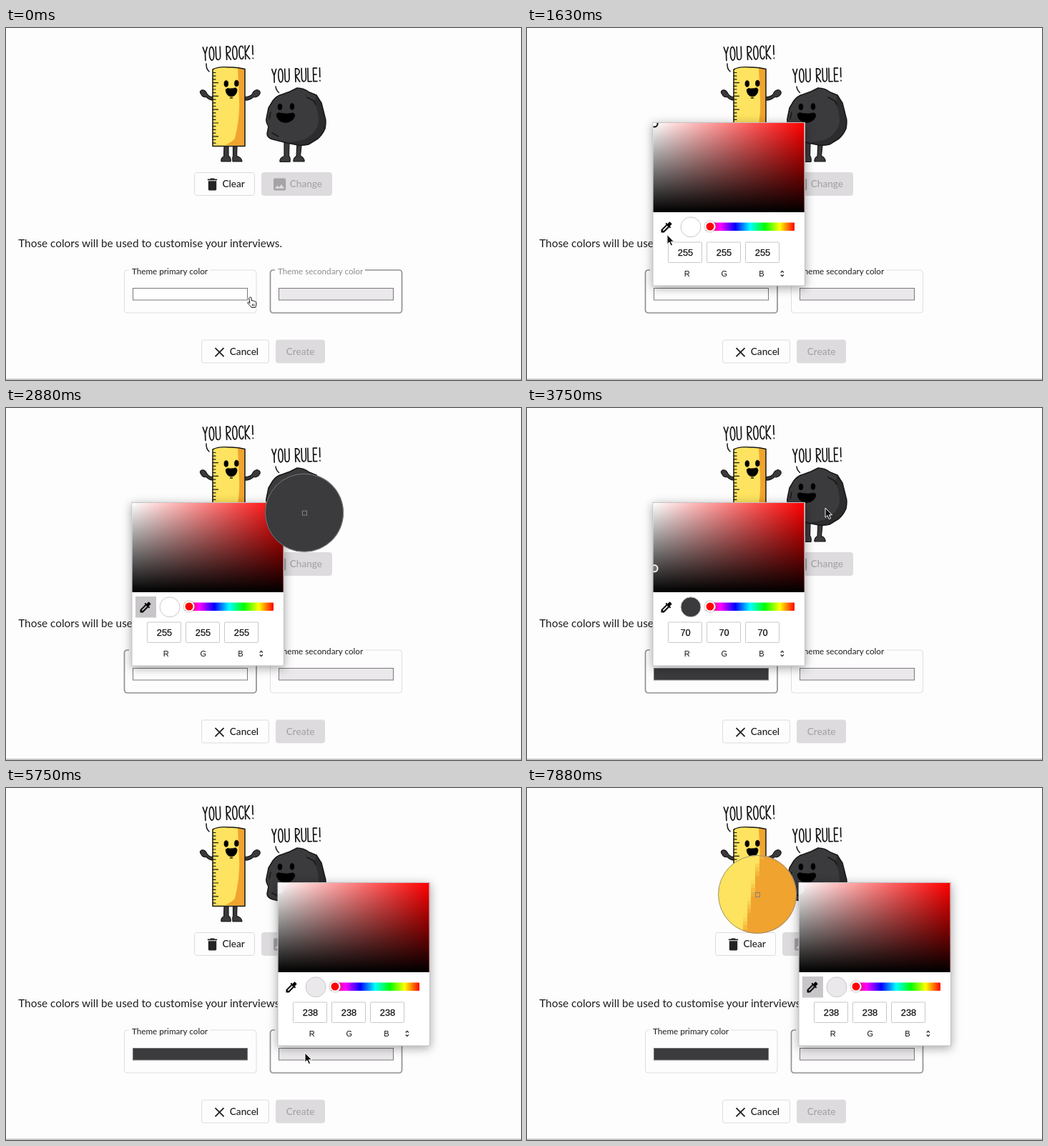
An HTML page with a canvas that plays this animation: 720 px wide and 493 px high, repeating every 8 s.

```html
<!DOCTYPE html>
<html lang="en">
<head>
<meta charset="utf-8">
<title>Theme colors</title>
<style>
  html, body { margin: 0; width: 100%; height: 100%; overflow: hidden; background: #fefdfe; }
  #stage { position: relative; width: 720px; height: 493px; overflow: hidden; }
  #stage > svg { position: absolute; inset: 0; }
  text { font-family: Lato, sans-serif; fill: #1e1d1f; }
  .body { font-size: 15.35px; }
  .btn text { font-size: 13.6px; font-weight: 500; }
  .btn path { fill: #232224; }
  .btn rect { fill: #fefdfe; stroke: #dcdadd; }
  .btn.off rect { fill: #dddbdd; stroke: #dddbdd; }
  .btn.off text, .btn.off path { fill: #a5a3a5; }

  .field path { fill: none; stroke: #dedcdf; }
  .field text { font-size: 11.7px; }
  .field rect { stroke: #79777a; }
  .field.focus path { stroke: #929093; stroke-width: 1.7; }
  .field.focus text { fill: #8f8d90; }

  .letters path { fill: none; stroke: #171717; stroke-width: 1.7; stroke-linecap: round; stroke-linejoin: round; }
  .line { fill: none; stroke: #171717; stroke-width: 1.5; stroke-linecap: round; stroke-linejoin: round; }
  .limb { fill: #3b3a3c; stroke: #171717; stroke-width: 1.2; stroke-linejoin: round; }
  .ink { fill: #000; stroke: #000; stroke-width: .8; stroke-linejoin: round; }

  .panel { fill: #fff; stroke: #c4c2c4; filter: drop-shadow(0 3px 7px rgba(0, 0, 0, .35)); }
  .num rect { fill: #fff; stroke: #cac8ca; }
  .num text { font: 12.8px "Liberation Sans", Arial, sans-serif; text-anchor: middle; fill: #111; stroke: #111; stroke-width: .25; }
  .num .cap { font-size: 11px; stroke: none; }

  #loupe { position: absolute; left: -55px; top: -55px; width: 110px; height: 110px; }
  #loupe canvas { width: 110px; height: 110px; border-radius: 50%; image-rendering: pixelated; }
  #loupe::before { content: ""; position: absolute; inset: 0; border: 1px solid rgba(136, 134, 136, .8); border-radius: 50%; box-sizing: border-box; }
  #loupe::after { content: ""; position: absolute; left: 52px; top: 52px; width: 5px; height: 5px; border: 1px solid #858385; }
</style>
</head>
<body>
<div id="stage">
<svg width="720" height="493" viewBox="0 0 720 493">
  <defs>
    <linearGradient id="sat"><stop stop-color="#fff"/><stop offset="1" stop-color="#f00"/></linearGradient>
    <linearGradient id="val" x2="0" y2="1"><stop stop-opacity="0"/><stop offset="1"/></linearGradient>
    <linearGradient id="hue"></linearGradient>
  </defs>

  <g class="letters" data-text="YOU ROCK!" transform="translate(275.2 27) rotate(-2)"></g>
  <g class="letters" data-text="YOU RULE!" transform="translate(371.7 57.700) rotate(-1.5)"></g>

  <g id="art">
    <path class="line" d="M280 50Q279.500 57 284 61M377 82Q377.500 87 381.500 90.500"/>
    <!-- ruler -->
    <path class="limb" d="M290 96.500Q284 97 281 92Q278 86 273.500 87Q269.500 89 273 93Q275 97.500 280 96.500Q284 101 290 101Z"/>
    <path class="limb" d="M333.500 96.500Q340 97 344 93Q346 87 351 86.500Q357 88 354.500 93Q351 98 346 96.500Q341 101.500 333.500 101Z"/>
    <path class="limb" d="M305 165H311L311 179Q315 182 314 187H301Q300 182 304.500 180Z"/>
    <path class="limb" d="M317.500 165H323L322.500 179Q330 182 330 187H317Q316 182 317.500 179Z"/>
    <path fill="#fde35f" d="M289 58Q298 53.500 312 55Q324 54.500 334 57.500V165.500H289Z"/>
    <path fill="#f0a32e" d="M324 56Q330 56 334 57.500V165.500L307 163.500Q316 160 319.800 155L322.500 143Q327 120 326 100Z"/>
    <path class="line" d="M289 58Q298 53.500 312 55Q324 54.500 334 57.500V165.500H289Z"/>
    <path class="ink" d="M305 78a2.800 4.300 0 1 0 5.600 0a2.800 4.300 0 1 0-5.600 0M319.500 77.500a2.800 4.300 0 1 0 5.600 0a2.800 4.300 0 1 0-5.600 0"/>
    <path class="ink" d="M307 86.500Q309 83.500 313 85Q318 85 321 83.800Q323.500 85 323 88Q321.500 95.500 315 96Q308 95.500 307 86.500Z"/>
    <path class="line" d="M313.500 98H316.500"/>
    <!-- rock -->
    <path class="limb" d="M389 160H396L395.500 179Q398 182 397 187.500H383Q382 182 389 179.500Z"/>
    <path class="limb" d="M407 160H413.500L411.500 179Q417.500 182 417 187H402Q401.500 182 406 179.500Z"/>
    <path fill="#3b3a3c" d="M407 84Q416 84 424 90L434 94Q437 99 441 105L446 125Q448 130 446 141Q442 150 436 155L423 163Q415 165 408 164L393 161L373 156Q365 154 365 148L367 138Q363 131 364 127L367 112L373 102Q378 95 386 93L397 89Z"/>
    <path fill="#2c2b2d" d="M434 94Q437 99 441 105L446 125Q448 130 446 141Q442 150 436 155L423 163Q415 165 408 164L393 161L415 157Q433 150 437 132Q437 115 431 104Z"/>
    <path class="line" d="M407 84Q416 84 424 90L434 94Q437 99 441 105L446 125Q448 130 446 141Q442 150 436 155L423 163Q415 165 408 164L393 161L373 156Q365 154 365 148L367 138Q363 131 364 127L367 112L373 102Q378 95 386 93L397 89Z"/>
    <path class="line" d="M421 97L430 102L433 107M370 118L368 127M372 147L381 152"/>
    <path class="ink" d="M380.200 110.500a2.800 4.300 0 1 0 5.600 0a2.800 4.300 0 1 0-5.600 0M397.200 110a2.800 4.300 0 1 0 5.600 0a2.800 4.300 0 1 0-5.600 0"/>
    <path class="ink" d="M378 121Q380 117.500 385 119.500Q394 121 401 119Q404.500 120 403.500 124Q400.500 132 390 132.500Q379 131 378 121Z"/>
  </g>
  <path id="ticks" class="line" style="stroke-width:1.2"/>

  <g class="btn"><rect x="263.500" y="202.500" width="84" height="32" rx="3"/><text x="302.500" y="222.500">Clear</text>
    <path transform="translate(277.100 207.600) scale(.95)" d="M6 19c0 1.100.9 2 2 2h8c1.100 0 2-.9 2-2V7H6v12zM19 4h-3.500l-1-1h-5l-1 1H5v2h14V4z"/></g>
  <g class="btn off"><rect x="357.500" y="202.500" width="98" height="32" rx="3"/><text x="396.800" y="222.500">Change</text>
    <path transform="translate(371.200 207.600) scale(.95)" d="M21 19V5c0-1.100-.9-2-2-2H5c-1.100 0-2 .9-2 2v14c0 1.100.9 2 2 2h14c1.100 0 2-.9 2-2zM8.500 13.500l2.500 3L14.500 12l4.500 6H5l3.500-4.500z"/></g>
  <text class="body" x="17.200" y="306.500">Those colors will be used to customise your interviews.</text>

  <g class="field" id="primary" transform="translate(165.500 339)">
    <path d="M119.500 0H180.500a4 4 0 0 1 4 4V56a4 4 0 0 1-4 4H4a4 4 0 0 1-4-4V4a4 4 0 0 1 4-4H6.500"/>
    <text x="10.500" y="6">Theme primary color</text><rect x="12" y="25.500" width="160" height="16.500"/>
  </g>
  <g class="field" id="secondary" transform="translate(369.500 339)">
    <path d="M132.500 0H180a4 4 0 0 1 4 4V56a4 4 0 0 1-4 4H4a4 4 0 0 1-4-4V4a4 4 0 0 1 4-4H6.500"/>
    <text x="10.500" y="6">Theme secondary color</text><rect x="12" y="25.500" width="160" height="16.500" fill="#eae8ea"/>
  </g>

  <g class="btn"><rect x="273.500" y="437" width="94" height="32" rx="3"/><text x="312.800" y="457.500">Cancel</text>
    <path d="M292.500 448.200L304.500 460.200M304.500 448.200L292.500 460.200" stroke="#1e1d1f" stroke-width="1.800"/></g>
  <g class="btn off"><rect x="377.500" y="437" width="68" height="32" rx="3"/><text x="391.800" y="457.500">Create</text></g>
  <path d="M0 492H720" stroke="#959397"/>

  <g id="picker">
    <rect class="panel" x="176" y="132.500" width="212.500" height="228.500"/>
    <rect x="176.500" y="133" width="211" height="125" fill="url(#sat)"/>
    <rect x="176.500" y="133" width="211" height="125" fill="url(#val)"/>
    <svg x="176.500" y="133" width="211" height="125"><circle id="dot" cx="1.500" r="4.600" fill="#fff" fill-opacity=".25" stroke-width="2"/></svg>
    <rect id="pick" x="181" y="264" width="29" height="29.500" fill="#c8c6c8"/>
    <path id="dropper" transform="translate(185.400 269.400) scale(.8)" stroke="#111" stroke-width=".7" d="M20.700 5.600l-2.300-2.300c-.4-.4-1-.4-1.400 0l-3.100 3.100-2-1.900-1.400 1.400 1.400 1.400L3 16.300V21h4.700l9-8.900 1.400 1.400 1.400-1.400-1.900-1.900 3.100-3.100c.4-.4.4-1 0-1.500zM6.900 19L5 17.100l8.100-8.100 1.900 1.900z"/>
    <circle id="preview" cx="229" cy="278.800" r="14" stroke="#cac8ca"/>
    <rect x="250" y="272.500" width="124" height="11.500" rx="1" fill="url(#hue)"/>
    <circle cx="256" cy="278" r="6.500" fill="#f00" stroke="#fff" stroke-width="2" style="filter:drop-shadow(0 0 1px #888)"/>
    <g class="num" id="nums"></g>
    <path d="M354.800 342.500l2-2.200 2 2.200M354.800 345.500l2 2.200 2-2.200" fill="none" stroke="#222" stroke-width="1.200"/>
  </g>

  <g id="cursor">
    <path id="hand" transform="translate(-3.500 -1)" fill="#fff" stroke="#111" d="M3 1.500c1-1.200 2.200-.6 2.400.6l.7 4c1-.8 2-.4 2.200.4.8-.6 1.800-.2 2 .6.900-.4 2 .2 2 1.300v3c0 1.500-.8 2.500-1.200 4H5.700C4.500 13 2 11.500.5 9.300c-.6-1 .6-1.800 1.600-1l1.400 1.200L2.200 3c-.2-.6.2-1.300.8-1.500zM7 10.500v3M9.200 10.500v3"/>
    <path id="arrow" transform="scale(.95)" fill="#111" stroke="#fff" d="M0 0V14l3.200-3 2.300 5.400 2.500-1-2.300-5.200H10z"/>
  </g>
</svg>
<div id="loupe"><canvas width="19" height="19"></canvas></div>
</div>

<script>
const $ = id => document.getElementById(id);
const NS = 'http://www.w3.org/2000/svg';
const add = (parent, tag, attrs, text = '') => {
  const el = document.createElementNS(NS, tag);
  for (const k in attrs) el.setAttribute(k, attrs[k]);
  el.textContent = text;
  return parent.appendChild(el);
};

// Hand lettering: [advance, stroke path]
const GLYPHS = {
  Y: [9, 'M0 0L3 9L6 0M3 9V18.500'], O: [9, 'M3 0C-1.200 0-1.200 18.500 3 18.500S7.200 0 3 0'],
  U: [8.800, 'M0 0V13C0 20 6 20 6 13V0'], R: [8.600, 'M0 18.500V0C7.500-.5 7.500 9 0 9.500L5.800 18.500'],
  C: [8.600, 'M5.800 3C5-1.500 0-1.500 0 9C0 20 5 20 5.800 15'], K: [10.500, 'M0 0V18.500M6 0L0 10.500L6 18.500'],
  L: [7.600, 'M0 0V18.500H5'], E: [9, 'M5 0H0V18.500H5M0 9H4.200'], '!': [4, 'M0 0V12.500M0 17.500V18'], ' ': [6, '']
};
for (const g of document.querySelectorAll('.letters')) {
  let x = 0;
  for (const ch of g.dataset.text) {
    add(g, 'path', { d: GLYPHS[ch][1], transform: `translate(${x})` });
    x += GLYPHS[ch][0];
  }
}

let ticks = '';
for (let i = 0; i < 22; i++) ticks += `M289 ${62.5 + i * 4.7}h${i % 4 == 3 ? 7.5 : 4}`;
$('ticks').setAttribute('d', ticks);

const HUES = ['#f00', '#f0f', '#00f', '#0ff', '#0f0', '#ff0', '#f00'];
HUES.forEach((c, i) => add($('hue'), 'stop', { offset: i / 6, 'stop-color': c }));

const values = ['R', 'G', 'B'].map((name, i) => {
  const x = 197.5 + i * 54;
  add($('nums'), 'rect', { x, y: 300, width: 47, height: 28.5, rx: 1 });
  add($('nums'), 'text', { x: 223.8 + i * 52, y: 347.8, class: 'cap' }, name);
  return add($('nums'), 'text', { x: x + 24, y: 318.7 });
});

// Pointer path: [ms, x, y]; cursor and loupe share it
const TRACK = [
  [0, 341, 377], [375, 318, 373], [875, 297, 368], [1000, 297, 368], [1500, 202, 292], [1750, 190, 287],
  [1875, 190, 287], [2000, 228, 282], [2250, 376, 247], [2625, 415, 156], [3000, 418, 142], [3250, 417, 140],
  [4250, 417, 140], [4500, 414, 152], [4750, 384, 238], [4875, 338, 314], [5250, 410, 371], [5500, 418, 371],
  [5750, 418, 371], [6125, 408, 310], [6500, 396, 271], [6750, 396, 271], [7000, 391, 259], [7250, 367, 205],
  [7500, 346, 165], [7625, 333, 155], [7875, 322, 149]
];
function pointAt(t) {
  const i = TRACK.findIndex(k => k[0] > t);
  if (i < 0) return TRACK.at(-1).slice(1);
  const [a, b] = [TRACK[i - 1], TRACK[i]];
  const p = (t - a[0]) / (b[0] - a[0]);
  return [a[1] + (b[1] - a[1]) * p, a[2] + (b[2] - a[2]) * p];
}

const art = [...document.querySelectorAll('#art path')].map(el => {
  const s = getComputedStyle(el);
  return { path: new Path2D(el.getAttribute('d')), fill: s.fill, stroke: s.stroke, width: parseFloat(s.strokeWidth) };
});
const dropper = new Path2D($('dropper').getAttribute('d'));
const g = document.querySelector('canvas').getContext('2d');
const ZOOM = 1.55;

function ramp(x, y, w, h, across, colors) {
  const grad = across ? g.createLinearGradient(x, 0, x + w, 0) : g.createLinearGradient(0, y, 0, y + h);
  colors.forEach((c, i) => grad.addColorStop(i / (colors.length - 1), c));
  g.fillStyle = grad;
  g.fillRect(x, y, w, h);
}

// Repaints the few pixels under the pointer for the loupe
function magnify(x, y, shift, color) {
  g.setTransform(ZOOM, 0, 0, ZOOM, 9.5 - ZOOM * x, 9.5 - ZOOM * y);
  g.fillStyle = '#fefdfe';
  g.fillRect(0, 0, 720, 493);
  for (const a of art) {
    if (a.fill != 'none') { g.fillStyle = a.fill; g.fill(a.path); }
    if (a.stroke != 'none') { g.strokeStyle = a.stroke; g.lineWidth = a.width; g.stroke(a.path); }
  }
  g.translate(shift, 0);
  g.fillStyle = '#fff';
  g.fillRect(176, 132, 213, 229);
  ramp(176.5, 133, 211, 125, true, ['#fff', '#f00']);
  ramp(176.5, 133, 211, 125, false, ['rgba(0,0,0,0)', '#000']);
  ramp(250, 272.5, 124, 11.5, true, HUES);
  g.fillStyle = '#c8c6c8';
  g.fillRect(181, 264, 29, 29.5);
  g.strokeStyle = '#cac8ca';
  g.lineWidth = 1;
  g.fillStyle = color;
  g.beginPath();
  g.arc(229, 278.8, 14, 0, 7);
  g.fill();
  g.stroke();
  for (let i = 0; i < 3; i++) g.strokeRect(197.5 + i * 54, 300, 47, 28.5);
  g.translate(185.4, 269.4);
  g.scale(.8, .8);
  g.fillStyle = '#000';
  g.fill(dropper);
}

const show = (el, on) => { el.style.visibility = on ? 'visible' : 'hidden'; };
const DARK = '#3b3a3c';

function render(t) {
  const [x, y] = pointAt(t);
  const second = t >= 5375;
  const shift = second ? 204 : 0;
  const value = second ? 238 : t >= 3500 ? 70 : 255;
  const color = { 255: '#fff', 70: DARK, 238: '#eae8ea' }[value];
  const first = t >= 500 && t < 5250;
  const open = first || second;
  const picking = t >= 1750 && t < 3500 || t >= 6500;
  const zoomed = t >= 1875 && t < 3500 || t >= 6750;

  $('primary').classList.toggle('focus', first);
  $('secondary').classList.toggle('focus', !first);
  $('primary').querySelector('rect').setAttribute('fill', t >= 3500 ? DARK : '#fff');

  $('picker').setAttribute('transform', `translate(${shift})`);
  show($('picker'), open);
  show($('pick'), open && picking);
  $('preview').setAttribute('fill', color);
  $('dot').setAttribute('cy', (1 - value / 255) * 125 + 1);
  $('dot').setAttribute('stroke', value == 255 && !picking ? '#111' : '#f2f0f2');
  values.forEach(v => { v.textContent = value; });

  show($('cursor'), !zoomed);
  show($('hand'), !zoomed && t < 500);
  show($('arrow'), !zoomed && t >= 500);
  $('cursor').setAttribute('transform', `translate(${x} ${y})`);

  show($('loupe'), zoomed);
  $('loupe').style.transform = `translate(${x}px, ${y}px)`;
  if (zoomed) magnify(x, y, shift, color);
}

const LOOP = 8000, STEP = 125;
const start = performance.now();
function tick() {
  const t = (performance.now() - start) % LOOP;
  render(Math.floor(t / STEP) * STEP);
  requestAnimationFrame(tick);
}
tick();
</script>
</body>
</html>
```
